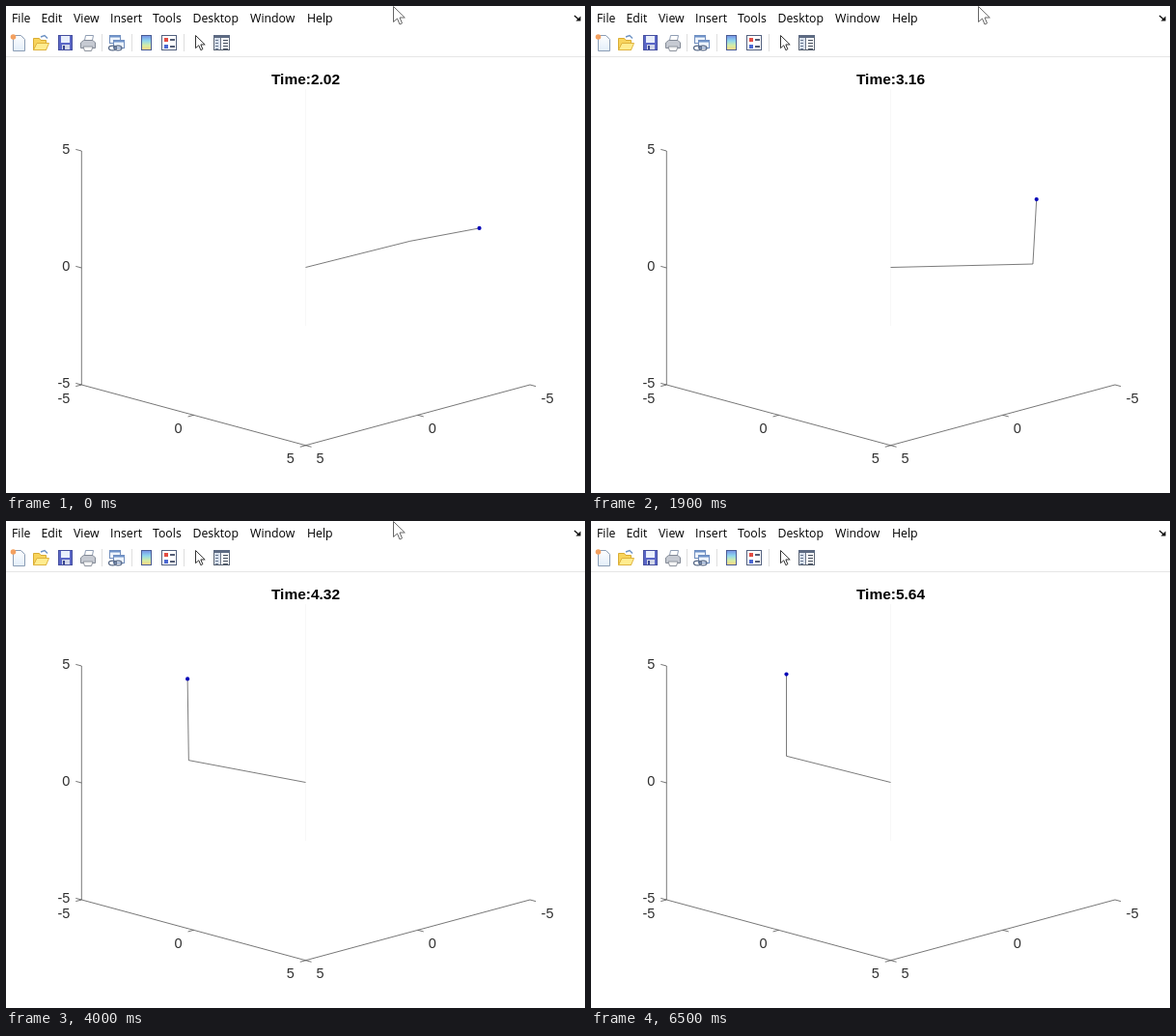
An HTML page with a canvas that plays this animation: 600x504 px, repeating every 6.6 s.

```html
<!DOCTYPE html>
<html lang="en">
<head>
<meta charset="utf-8">
<title>Rotary pendulum</title>
<style>
html, body { margin: 0; width: 100%; height: 100%; overflow: hidden; background: #fff; }
canvas { display: block; }
</style>
</head>
<body>
<canvas id="c" width="600" height="504"></canvas>
<script>
const ctx = document.getElementById('c').getContext('2d');
const LOOP = 6600, STEP = 100, RAD = Math.PI / 180;
const CX = 310.5, CY = 270.5;
const CAUGHT = 3400, POINTER_GONE = 5700;
const UI = '12.3px "Open Sans", "Noto Sans", sans-serif';
const SANS = '"Liberation Sans", Arial, sans-serif';

// Key points [ms, degrees] of the fast part of the motion
const ARM_SPIN = [[1650, -27], [1900, -5], [2100, 66], [2400, 125], [2800, 163], [CAUGHT, 196.4]];
const TILT_SPIN = [
  [900, 308], [1100, 289], [1300, 187], [1600, 85], [1900, 22],
  [2100, -14], [2500, -165], [2800, -312], [3000, -350], [CAUGHT, -363.5]
];

function swing(t, t0, t1, a, b) {
  return a + (b - a) * (1 - Math.cos(Math.PI * (t - t0) / (t1 - t0))) / 2;
}

function settle(t, from, to) {
  return to + (from - to) * Math.exp((CAUGHT - t) / 504);
}

// Cubic Hermite through unevenly spaced points
function spline(pts, t) {
  let i = 0;
  while (i < pts.length - 2 && t >= pts[i + 1][0]) i++;
  const [t0, a] = pts[i], [t1, b] = pts[i + 1], h = t1 - t0, u = (t - t0) / h;
  const slope = k => {
    const p = pts[Math.max(k - 1, 0)], n = pts[Math.min(k + 1, pts.length - 1)];
    return (n[1] - p[1]) / (n[0] - p[0]) * h;
  };
  const u2 = u * u, u3 = u2 * u, s = 3 * u2 - 2 * u3;
  return a * (1 - s) + b * s + slope(i) * (u3 - 2 * u2 + u) + slope(i + 1) * (u3 - u2);
}

function armAt(t) {
  if (t < 1000) return swing(t, 0, 1000, -43, 42);
  if (t < 1650) return swing(t, 1000, 1650, 42, -27);
  return t < CAUGHT ? spline(ARM_SPIN, t) : settle(t, 196.4, 223.2);
}

// Degrees from upright
function tiltAt(t) {
  if (t < 900) return swing(t, -110, 900, 59, 308);
  return t < CAUGHT ? spline(TILT_SPIN, t) : settle(t, -363.5, -360);
}

// The clock runs a little faster while the pendulum swings up
function clockAt(t) {
  const n = t / STEP;
  const v = 2.02 + 0.0525 * n + 0.208 * (1 - Math.exp(-((n / 17.5) ** 2)));
  return (Math.round(v * 50) / 50).toFixed(2);
}

function rect(x, y, w, h, fill) {
  ctx.fillStyle = fill;
  ctx.fillRect(x, y, w, h);
}

function path(pts, { fill, stroke, width = 1 }) {
  ctx.beginPath();
  for (let i = 0; i < pts.length; i += 2) ctx.lineTo(pts[i], pts[i + 1]);
  if (fill) { ctx.closePath(); ctx.fillStyle = fill; ctx.fill(); }
  if (stroke) { ctx.strokeStyle = stroke; ctx.lineWidth = width; ctx.stroke(); }
}

function box(x, y, w, h, fill, stroke) {
  rect(x, y, w, h, fill);
  ctx.strokeStyle = stroke;
  ctx.lineWidth = 1;
  ctx.strokeRect(x, y, w, h);
}

function dot(x, y, r, fill) {
  ctx.beginPath();
  ctx.arc(x, y, r, 0, 7);
  ctx.fillStyle = fill;
  ctx.fill();
}

function text(s, x, y, font, fill, align = 'left') {
  ctx.font = font;
  ctx.fillStyle = fill;
  ctx.textAlign = align;
  ctx.fillText(s, x, y);
}

function pointer(x, y, k, stroke) {
  const p = [0, 0, 0, 16, 4, 12.5, 6.5, 18.5, 9, 17.3, 6.5, 11.5, 11.8, 11.5];
  path(p.map((v, i) => v * k + (i % 2 ? y : x)), { fill: '#fff', stroke });
}

function fade(y0, y1, ...colors) {
  const g = ctx.createLinearGradient(0, y0, 0, y1);
  colors.forEach((c, i) => g.addColorStop(i / (colors.length - 1), c));
  return g;
}

function menu() {
  const items = { File: 6, Edit: 36.5, View: 70, Insert: 108, Tools: 152, Desktop: 193.5, Window: 253, Help: 312 };
  for (const name in items) text(name, items[name], 17, UI, '#000');
  path([589, 10, 593.5, 14], { stroke: '#111', width: 1.4 });
  path([595.5, 10.5, 595.5, 15.5, 590.5, 15.5], { fill: '#111' });
}

function toolbar() {
  rect(0, 52, 600, 1, '#e6e6e6');
  for (const x of [99, 130, 184]) rect(x, 29, 1, 18, '#dedede');

  // new
  path([7.5, 30.5, 15.5, 30.5, 19.5, 34.5, 19.5, 46.5, 7.5, 46.5], { fill: fade(30, 47, '#fff', '#e2edf9'), stroke: '#8b9db5' });
  dot(7.5, 32, 2.8, '#f3a05f');

  // open
  path([28.5, 45.5, 28.5, 33.5, 34.5, 33.5, 36, 35.5, 41.5, 35.5, 41.5, 45.5], { fill: '#f8d45c', stroke: '#d9ac34' });
  path([28.5, 45.5, 32, 38.5, 44.5, 38.5, 41.5, 45.5], { fill: '#ffec8f', stroke: '#e0b440' });
  path([36, 32, 40, 30.5, 43, 33.5], { stroke: '#6d92c4', width: 1.4 });

  // save
  box(54.5, 30.5, 14, 15, '#5a66c6', '#454f9f');
  rect(57, 31, 9, 7, '#e9effc');
  rect(58, 40, 8, 5, '#d2d7e8');
  rect(59, 41, 2, 4, '#39458f');

  // print
  path([81, 38, 82.5, 30.5, 90.5, 30.5, 89, 38], { fill: '#fff', stroke: '#8f9db3' });
  path([77.5, 38, 80.5, 35.5, 90, 35.5, 92.5, 38, 92.5, 43.5, 77.5, 43.5], { fill: '#c6cad2', stroke: '#848b97' });
  path([80, 42, 90, 42, 88.5, 46.5, 81.5, 46.5], { fill: '#f6f6f6', stroke: '#8f959f' });

  // link
  for (const [x, y] of [[107.5, 30.5], [111.5, 35.5]]) {
    box(x, y, 11, 8, '#eef4fc', '#728ebc');
    rect(x, y, 11, 2, '#6f93ca');
  }
  ctx.strokeStyle = '#5a6b88';
  ctx.lineWidth = 1.3;
  for (const x of [110.5, 116]) {
    ctx.beginPath();
    ctx.ellipse(x, 43.5, 4, 2.4, 0, 0, 7);
    ctx.stroke();
  }

  // colorbar
  box(140.5, 30.5, 10, 15, fade(31, 46, '#7795e6', '#8fd7ee', '#d7eda2', '#f8cf82'), '#4a5c93');

  // legend
  box(161.5, 30.5, 15, 15, '#fff', '#53617f');
  [[33, '#e34c43'], [40, '#4b68d1']].forEach(([y, color]) => {
    rect(164, y, 4, 4, color);
    rect(170, y + 1, 5, 2, '#555e76');
  });

  pointer(196.5, 30.5, 0.82, '#333');

  // inspector
  box(215.5, 30.5, 16, 15, '#fff', '#5d6674');
  rect(215, 30, 17, 3, '#5d6a82');
  rect(216, 33, 6, 12, '#d9e1ed');
  rect(222, 33, 1, 12, '#6c7585');
  for (let y = 35; y < 45; y += 3) {
    rect(217, y, 3, 1, '#687790');
    rect(225, y, 5, 1, '#444d5c');
  }
}

function axes() {
  const ink = { stroke: '#4a4a4a', width: 0.75 };
  const label = (s, x, y) => text(s, x, y, '14.5px ' + SANS, '#303030', 'right');
  rect(310, 86, 1, 245, '#f8f8f8');
  path([78.3, 150, 78.3, 392, CX, 454.7, 543, 392], ink);
  for (let k = 0; k < 3; k++) {
    const z = 150 + k * 121, y = 392 + k * 31.35, d = k * 116.25, v = k * 5 - 5;
    path([78.3, z, 72.3, z - 1.6], ink);
    path([78.3 + d, y, 72.3 + d, y + 1.6], ink);
    path([543 - d, y, 549 - d, y + 1.6], ink);
    label(-v, 66.3, z + 3);
    label(v, 66.3 + d, y + 18.5);
    label(v, (v < 0 ? 567.5 : 562) - d, y + 18.5);
  }
}

function pendulum(t) {
  const arm = armAt(t) * RAD, tilt = tiltAt(t) * RAD;
  const ex = CX + 148 * Math.cos(arm), ey = CY + 39.8 * Math.sin(arm);
  const side = Math.sin(tilt);
  const x = ex - 115 * Math.sin(arm) * side;
  const y = ey + 31 * Math.cos(arm) * side - 84.7 * Math.cos(tilt);
  path([CX, CY, ex, ey, x, y], { stroke: '#333', width: 0.65 });
  dot(x, y, 2.1, '#0808b8');
}

function draw(now) {
  const t = Math.floor(now % LOOP / STEP) * STEP;
  rect(0, 0, 600, 504, '#fff');
  menu();
  toolbar();
  axes();
  text('Time:' + clockAt(t), CX, 81.3, 'bold 15.5px ' + SANS, '#000', 'center');
  pendulum(t);
  if (t < POINTER_GONE) pointer(401.5, 0.5, 1, '#666');
}

const start = performance.now();
function tick() {
  draw(performance.now() - start);
  requestAnimationFrame(tick);
}
tick();
</script>
</body>
</html>
```
